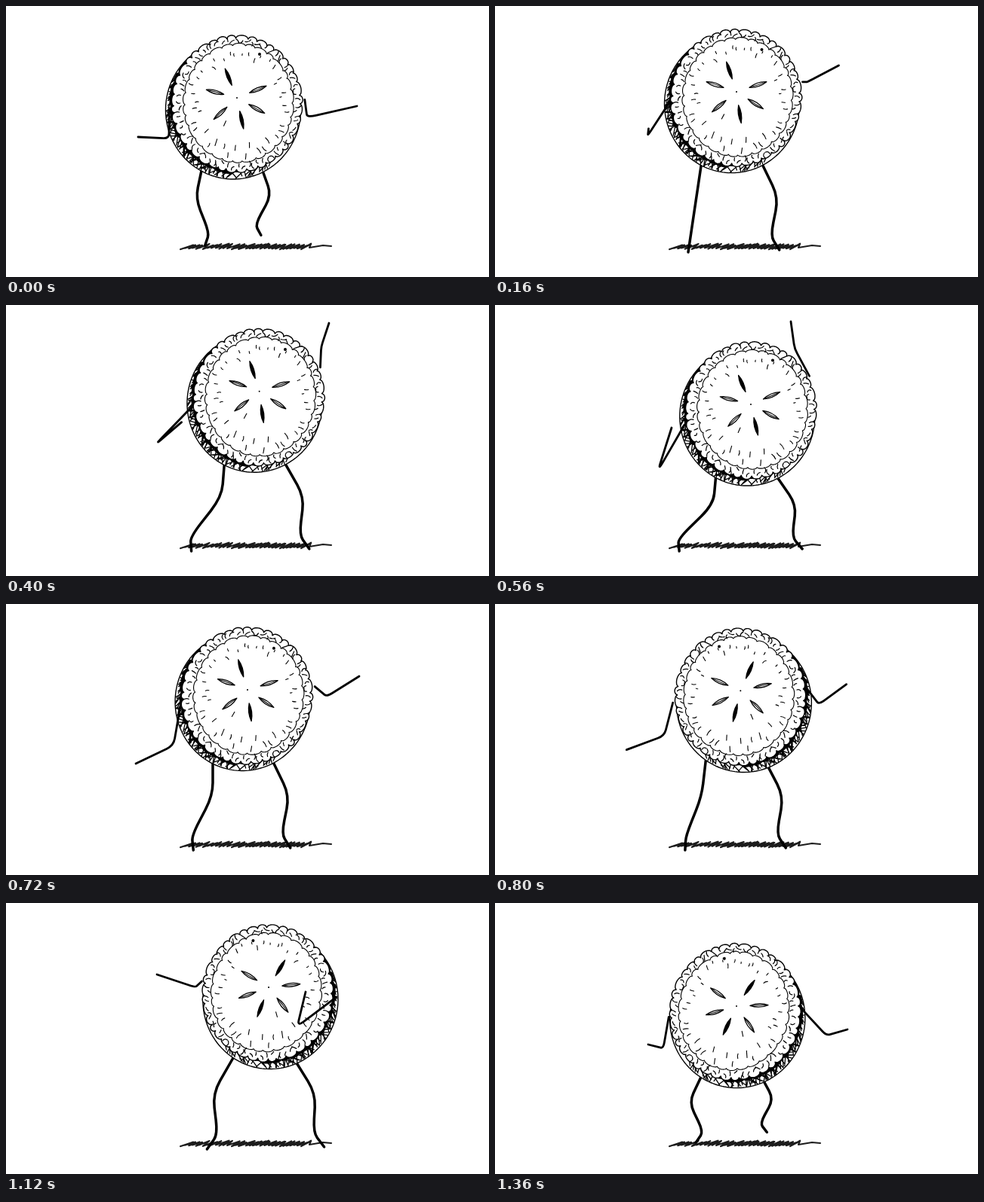
Write an HTML page with a canvas that moves like this. It is 640x360 px and loops after 1440 ms.

```html
<!DOCTYPE html>
<html lang="en">
<head>
<meta charset="utf-8">
<title>Dancing pie</title>
<style>
  html, body { margin: 0; width: 100%; height: 100%; overflow: hidden; background: #fff; }
  canvas { display: block; width: 640px; height: 360px; }
</style>
</head>
<body>
<canvas id="stage" width="640" height="360"></canvas>
<script>
const ctx = document.getElementById('stage').getContext('2d');
const STEP = 80, STEPS = 18, FLIP_STEP = 10;
const TAU = Math.PI * 2, RAD = Math.PI / 180;
const lerp = (a, b, t) => a + (b - a) * t;

let seed = 11;
const rand = (lo = 0, hi = 1) => {
  seed = (seed * 16807) % 2147483647;
  return lo + (hi - lo) * seed / 2147483647;
};

// Key poses: pie is x, y, tilt; arms are elbow and hand points
const poses = [
  { step: 0, pie: [306, 122, 0], left: [216, 176, 175, 174], right: [399, 148, 465, 133] },
  { step: 4, pie: [334, 106, 7], left: [189, 168, 232, 152], right: [428, 54, 446, 25] },
  { step: 7, pie: [339, 132, -1], left: [216, 220, 234, 163], right: [397, 58, 392, 22] },
  { step: 9, pie: [320, 114, 5], left: [222, 188, 172, 212], right: [425, 123, 468, 96] },
  { step: 12, pie: [336, 118, -5], left: [229, 149, 179, 157], right: [438, 154, 461, 128] },
  { step: 14, pie: [348, 112, 9], left: [251, 112, 200, 95], right: [386, 164, 397, 118] },
  { step: 17, pie: [320, 137, 13], left: [223, 193, 203, 188], right: [439, 176, 467, 168] }
];

function poseAt(step) {
  const i = poses.findLastIndex(p => p.step <= step);
  const a = poses[i], b = poses[(i + 1) % poses.length];
  const t = (step - a.step) / ((b.step || STEPS) - a.step);
  const mix = part => a[part].map((v, k) => lerp(v, b[part][k], t));
  return { pie: mix('pie'), left: mix('left'), right: mix('right') };
}

// Triangular pulse around a step, wrapping with the loop
function hop(step, peak) {
  const d = Math.abs(step - peak);
  return Math.max(0, 1 - Math.min(d, STEPS - d) / 2);
}

const ring = (x, y, rx, ry) => (a, grow = 0) =>
  [x + (rx + grow) * Math.cos(a), y + (ry + grow) * Math.sin(a)];
const crust = ring(0, 8, 85, 89);
const filling = ring(2, 7, 72, 78);
const tin = ring(-5, 16, 89.5, 92);

function scallop(edge, count, depth) {
  const path = new Path2D();
  let from = 0;
  for (let i = 1; i <= count; i++) {
    const to = (i === count ? count : i + rand(-.2, .2)) / count * TAU;
    const height = depth * rand(.7, 1.3);
    for (let t = 0; t < 1; t += .1)
      path.lineTo(...edge(lerp(from, to, t), height * (Math.sqrt(Math.sin(t * Math.PI)) - .4)));
    from = to;
  }
  path.closePath();
  return path;
}

function dash(path, x, y, angle, length, curve = 0) {
  const dx = Math.cos(angle) * length / 2, dy = Math.sin(angle) * length / 2;
  path.moveTo(x - dx, y - dy);
  path.quadraticCurveTo(x - dy * curve, y + dx * curve, x + dx, y + dy);
}

function arc(edge, from, to, grow = 0) {
  const path = new Path2D();
  for (let d = from; d <= to; d += 2) path.lineTo(...edge(d * RAD, grow));
  return path;
}

function makeHatching() {
  const path = new Path2D();
  for (let d = 58; d < 222; d += d < 105 ? 2 : 1.2) {
    path.moveTo(...crust((d + rand(-2, 2)) * RAD, -2));
    path.lineTo(...tin((d + rand(-9, 9)) * RAD, rand(-4, 0)));
  }
  return path;
}

function makeCrimps() {
  const path = new Path2D();
  for (let i = 0; i < 74; i++) {
    const a = (i + rand(0, .7)) / 74 * TAU;
    const [x0, y0] = filling(a), [x1, y1] = crust(a);
    const t = rand(.25, .8);
    dash(path, lerp(x0, x1, t), lerp(y0, y1, t), a + rand(-1.2, 1.2), rand(4, 8), rand(-1.2, 1.2));
  }
  return path;
}

function makeFlecks() {
  const path = new Path2D();
  for (let i = 0; i < 40; i++) {
    const a = (i + rand(0, .9)) / 40 * TAU;
    const low = Math.max(0, Math.sin(a));
    dash(path, ...filling(a, -rand(5, 20)), a + rand(-.3, .3), rand(2, 6) + 4 * low, rand(-.6, .6));
  }
  dash(path, -16, 34, 2, 7);
  return path;
}

const art = {
  tin: arc(tin, 0, 360),
  hatching: makeHatching(),
  shade: Array.from({ length: 34 }, (_, i) => {
    const d = 85 + i * 4;
    return { path: arc(crust, d, d + 4, 1), width: rand(2, 8) };
  }),
  crust: scallop(crust, 40, 3.4),
  filling: scallop(filling, 30, 2.4),
  crimps: makeCrimps(),
  flecks: makeFlecks()
};
const slitAngles = [-112, -22, 29, 78, 137, 195];

function stroke(path, width) {
  ctx.lineWidth = width;
  ctx.stroke(path);
}

function drawSlit(angle) {
  const steep = Math.abs(Math.sin(angle * RAD)) > .8;
  const leaf = new Path2D(), near = 18, far = 42, width = steep ? 4 : 4.5;
  leaf.moveTo(near, 0);
  leaf.quadraticCurveTo(30, -width, far, 0);
  leaf.quadraticCurveTo(30, width, near, 0);
  ctx.save();
  ctx.rotate(angle * RAD);
  ctx.fillStyle = steep ? '#000' : '#fff';
  ctx.fill(leaf);
  stroke(leaf, 1.3);
  if (!steep) {
    const grain = new Path2D();
    dash(grain, 30, 0, 0, 18, .06);
    stroke(grain, 1);
  }
  ctx.restore();
}

function drawDot(x, y, r) {
  ctx.fillStyle = '#000';
  ctx.beginPath();
  ctx.arc(x, y, r, 0, TAU);
  ctx.fill();
}

function drawPie([x, y, tilt], flipped) {
  ctx.save();
  ctx.translate(x, y);
  ctx.rotate(tilt * RAD);
  if (flipped) ctx.scale(-1, 1);
  ctx.fillStyle = '#fff';
  ctx.fill(art.tin);
  stroke(art.tin, 1.4);
  ctx.save();
  ctx.clip(art.tin);
  stroke(art.hatching, 1.3);
  for (const { path, width } of art.shade) stroke(path, width);
  ctx.restore();
  ctx.fill(art.crust);
  stroke(art.crust, 1.4);
  stroke(art.filling, 1.1);
  stroke(art.crimps, 1.2);
  stroke(art.flecks, 1.1);
  slitAngles.forEach(drawSlit);
  drawDot(0, 0, 1);
  drawDot(30, -58, 2);
  ctx.restore();
}

// Rounds each inner corner; soft 0 is angular, 1 is flowing
function drawLimb(points, soft, width) {
  const path = new Path2D();
  const toward = (a, b) => [lerp(a[0], b[0], soft / 2), lerp(a[1], b[1], soft / 2)];
  path.moveTo(...points[0]);
  for (let i = 1; i < points.length - 1; i++) {
    path.lineTo(...toward(points[i], points[i - 1]));
    path.quadraticCurveTo(...points[i], ...toward(points[i], points[i + 1]));
  }
  path.lineTo(...points.at(-1));
  stroke(path, width);
}

// The shoulder slides along the rim, following the elbow's height
function drawArm([x, y], [elbowX, elbowY, handX, handY], side) {
  const rise = (elbowY - y) * .4 - 8;
  const shoulder = [x + side * Math.sqrt(90 ** 2 - (rise - 8) ** 2), y + rise];
  drawLimb([shoulder, [elbowX, elbowY], [handX, handY]], .35, 2.8);
}

// The knee bows one way and the ankle swings back the other
function drawLeg(hip, foot, bow) {
  const along = (t, push) => [lerp(hip[0], foot[0], t) + push, lerp(hip[1], foot[1], t)];
  drawLimb([hip, along(.4, bow), along(.84, -bow * .6), foot], .7, 3.5);
}

function drawLegs([x, y], step) {
  const kick = hop(step, 12), lift = hop(step, 17.5);
  const wave = offset => Math.sin(TAU * (step + offset) / STEPS);
  drawLeg([x - 46, y + 92],
    [256 + 12 * wave(7), 327 - 23 * kick - 12 * lift], 16 * wave(-2) - 18 * kick);
  drawLeg([x + 33, y + 94],
    [388 + 1.6 * (x - 327) - 22 * lift, 324 - 26 * lift], 13);
}

const ground = new Path2D();
for (let x = 231; x < 396; x += rand(4, 6)) {
  ground.lineTo(x, rand(321, 323.5));
  ground.lineTo(x + rand(12, 18), rand(315.5, 318));
}
ground.lineTo(402, 321);
ground.lineTo(420, 318);
ground.lineTo(431, 319);

function draw(step) {
  const { pie, left, right } = poseAt(step);
  ctx.fillStyle = '#fff';
  ctx.fillRect(0, 0, 640, 360);
  ctx.lineCap = ctx.lineJoin = 'round';
  ctx.strokeStyle = '#1c1c1c';
  stroke(ground, 2.1);
  ctx.strokeStyle = '#000';
  drawLegs(pie, step);
  drawPie(pie, step >= FLIP_STEP);
  drawArm(pie, left, -1);
  drawArm(pie, right, 1);
}

const start = performance.now();
function tick() {
  draw(Math.floor((performance.now() - start) / STEP) % STEPS);
  requestAnimationFrame(tick);
}
tick();
</script>
</body>
</html>
```
